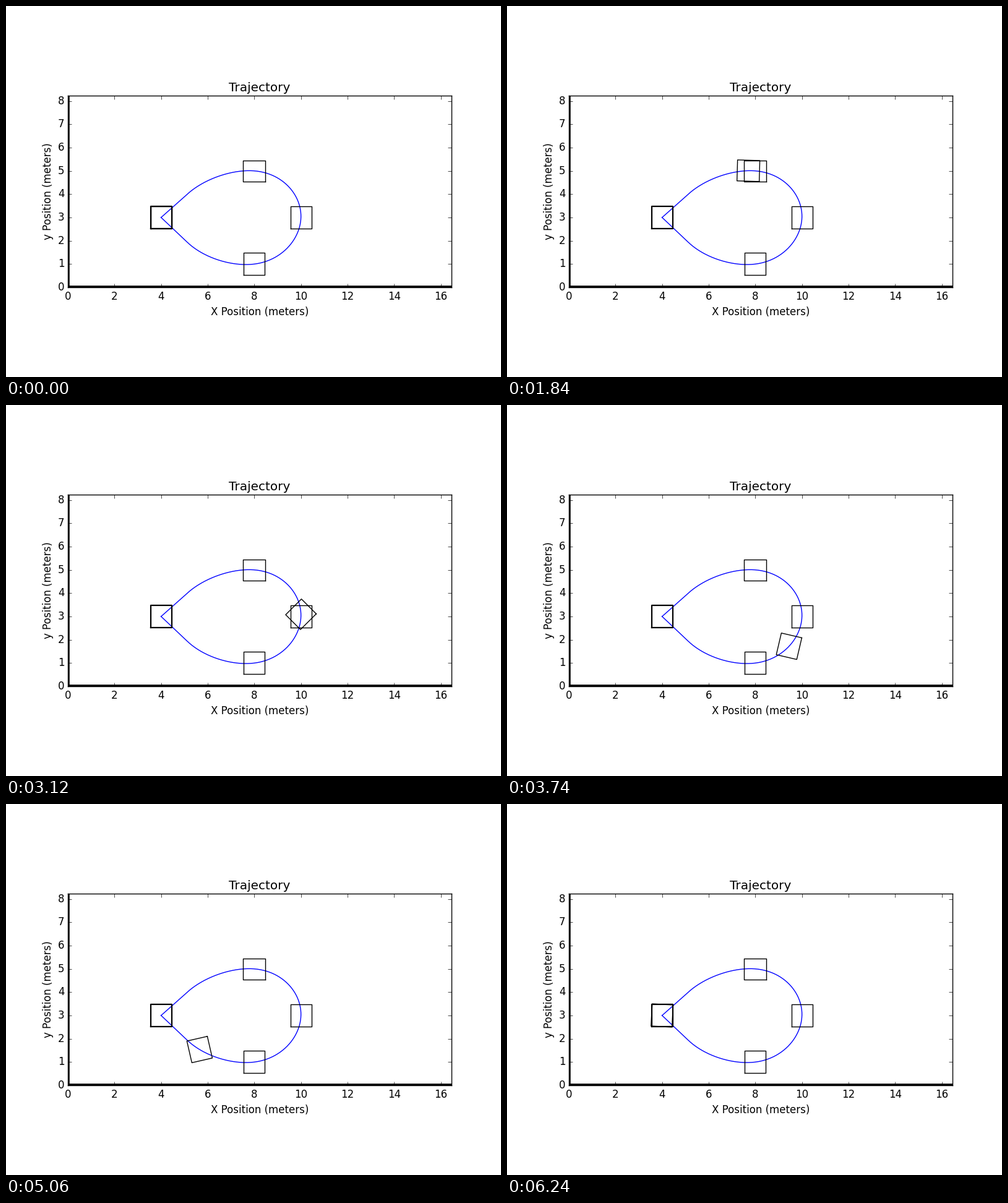
A matplotlib script for the animation above (6260 ms loop, 800x600 px).

```python
import numpy as np
import matplotlib.pyplot as plt
from matplotlib.animation import FuncAnimation

plt.style.use("classic")
plt.rcParams.update({"font.family": "DejaVu Sans", "savefig.dpi": 100,
                     "figure.facecolor": "white"})

FRAMES, STEP = 313, 20
FIELD_W, FIELD_H = 16.46, 8.23
ROBOT_W, ROBOT_H = 0.9, 0.955

# Stops on the course, plus where full thrust ends and full braking begins.
HOME, TOP, RIGHT, BOTTOM = (4, 3), (8, 5), (10, 3), (8, 1)
THRUST_END, BRAKE_START = (5.145, 4.02), (5.135, 1.925)

TIMES = np.array([0, 1, 1.936, 3.16, 4.33, 5.26, 6.26])
PLACES = np.array([HOME, THRUST_END, TOP, RIGHT, BOTTOM, BRAKE_START, HOME])
HEADINGS = np.array([[0], [65], [90], [137], [189], [190.5], [177]])


def spline(knots, thrust=False):
    """Cubic spline at rest at both ends; thrust keeps the first and
    last legs at constant acceleration."""
    gap = np.diff(TIMES)
    slope = np.diff(knots, axis=0) / gap[:, None]
    n = len(TIMES)
    a, b = np.eye(n), np.zeros(knots.shape)
    if thrust:
        b[1], b[-2] = 2 * slope[0], 2 * slope[-1]
    skip = 2 if thrust else 1
    for i in range(skip, n - skip):
        g0, g1 = gap[i - 1], gap[i]
        a[i, i - 1:i + 2] = g1, 2 * (g0 + g1), g0
        b[i] = 3 * (g1 * slope[i - 1] + g0 * slope[i])
    rate = np.linalg.solve(a, b)

    def at(t):
        t = np.atleast_1d(t)
        i = np.clip(np.searchsorted(TIMES, t, side="right") - 1, 0, n - 2)
        g = gap[i][:, None]
        s = (t - TIMES[i])[:, None] / g
        blend = s * s * (3 - 2 * s)
        return (knots[i] * (1 - blend) + knots[i + 1] * blend
                + g * s * (1 - s) * (rate[i] * (1 - s) - rate[i + 1] * s))
    return at


place = spline(PLACES, thrust=True)
heading = spline(HEADINGS)


def outline(x, y, deg=0):
    """Closed outline of the robot."""
    u = np.array([-1, 1, 1, -1, -1]) * ROBOT_W / 2
    v = np.array([-1, -1, 1, 1, -1]) * ROBOT_H / 2
    c, s = np.cos(np.radians(deg)), np.sin(np.radians(deg))
    return x + c * u - s * v, y + s * u + c * v


fig, ax = plt.subplots(figsize=(8, 6), dpi=100)
ax.set_xlim(0, FIELD_W)
ax.set_ylim(0, FIELD_H)
ax.set_aspect("equal")
ax.set_title("Trajectory")
ax.set_xlabel("X Position (meters)")
ax.set_ylabel("y Position (meters)")

ax.axhline(0, color="k", lw=4)
ax.axvline(0, color="k", lw=4)
ax.plot(*place(np.linspace(0, TIMES[-1], 400)).T, "b", lw=1)

ax.plot(*outline(*HOME), "k", lw=1.6)
ax.plot(*outline(*TOP, 90), "k", lw=1)
ax.plot(*outline(*RIGHT), "k", lw=1)
ax.plot(*outline(*BOTTOM), "k", lw=1)
robot, = ax.plot([], [], "k", lw=1)


def draw(i):
    t = i * STEP / 1000
    robot.set_data(*outline(*place(t)[0], heading(t)[0, 0]))
    return robot,


anim = FuncAnimation(fig, draw, frames=FRAMES, interval=STEP, repeat=True)
plt.show()
```
